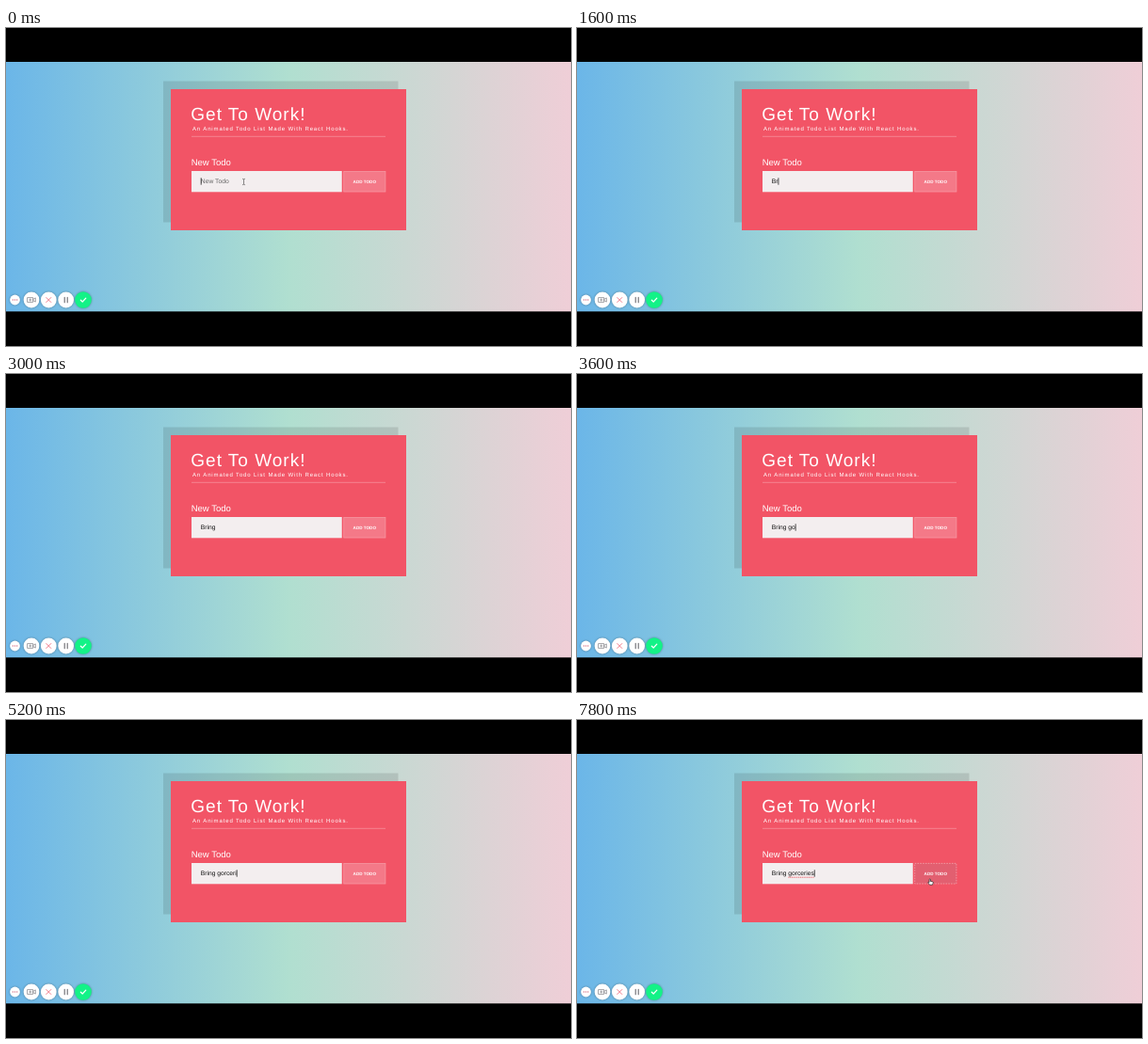
An HTML page that plays this animation: 600x338 px, repeating every 8 s.

```html
<!DOCTYPE html>
<html lang="en">
<head>
<meta charset="utf-8">
<title>Todo list</title>
<style>
  html, body { margin: 0; width: 100%; height: 100%; overflow: hidden; background: #000; }
  svg { display: block; width: 100vw; height: 100vh; }
  text { font-family: "Liberation Sans", Arial, Helvetica, sans-serif; fill: #fff;
         text-rendering: geometricPrecision; white-space: pre; }
  .tools > circle { filter: drop-shadow(0 .6px 1.2px rgba(0, 0, 0, .35)); }
</style>
</head>
<body>
<svg viewBox="0 0 600 338">
  <defs>
    <linearGradient id="sky">
      <stop offset="0" stop-color="#6bb6e8"/>
      <stop offset=".5" stop-color="#b0dfd0"/>
      <stop offset="1" stop-color="#efced7"/>
    </linearGradient>
  </defs>
  <rect width="600" height="338"/>
  <rect y="36" width="600" height="265.3" fill="url(#sky)"/>

  <!-- card -->
  <rect x="167" y="56.5" width="249.5" height="150" fill="#000" opacity=".11"/>
  <rect x="175" y="65" width="250" height="150" fill="#f25466"/>
  <text x="196.3" y="97.6" font-size="19" letter-spacing="1">Get To Work!</text>
  <text x="198" y="108.7" font-size="6" letter-spacing=".87">An Animated Todo List Made With React Hooks.</text>
  <path d="M197 115.3H403" stroke="#fff" stroke-opacity=".35" stroke-width=".8"/>
  <text x="196.7" y="146.3" font-size="9.5">New Todo</text>

  <!-- form -->
  <rect x="197" y="152" width="159.7" height="22.3" fill="#f3eeef"/>
  <text id="hint" x="206.8" y="165" font-size="6.75" style="fill:#666">New Todo</text>
  <text id="typed" x="206.8" y="165" font-size="6.7" style="fill:#111"></text>
  <path id="squiggle" fill="none" stroke="#e8434f" stroke-width=".8" stroke-dasharray="1.2 .6"/>
  <path id="caret" d="M0 159.3V166.7" stroke="#222" stroke-width=".8"/>
  <rect id="button" x="358.7" y="152.4" width="44.2" height="21.6" stroke-width=".8"/>
  <text x="368.6" y="164.8" font-size="4.6" font-weight="bold">ADD TODO</text>

  <!-- recorder controls -->
  <g class="tools" fill="none" stroke-linecap="round" stroke-linejoin="round">
    <circle cx="9.5" cy="289" r="5.4" fill="#fff"/>
    <circle cx="27" cy="289" r="8.4" fill="#fff"/>
    <circle cx="45.3" cy="289" r="8.4" fill="#fff"/>
    <circle cx="63.7" cy="289" r="8.4" fill="#fff"/>
    <circle cx="82" cy="289" r="8.8" fill="#13f287"/>
    <path d="M7.3 289h0M9.5 289h0M11.7 289h0" stroke="#d2657a" stroke-width="1.3"/>
    <path d="M23 286.6h5.7v4.8H23zM28.7 288.4l2.6-1.5v4.2l-2.6-1.5M24.7 289h2.2M25.8 287.9v2.2" stroke="#8b8b90" stroke-width=".8"/>
    <path d="M42.8 286.5l5 5M47.8 286.5l-5 5" stroke="#f17f8e" stroke-width="1"/>
    <path d="M62.2 286.2v5.6M65.2 286.2v5.6" stroke="#6c6c72" stroke-width="1.1"/>
    <path d="M79.3 289.2l1.9 1.8 3.6-3.8" stroke="#fff" stroke-width="1.2"/>
  </g>

  <!-- pointers -->
  <path id="beam" d="M-1.3 -3.2Q0 -3.2 0 -2.2Q0 -3.2 1.3 -3.2M0 -2.2V2.2M-1.3 3.2Q0 3.2 0 2.2Q0 3.2 1.3 3.2"
        fill="none" stroke="#555" stroke-width=".7"/>
  <path id="hand" d="M-1.4 -2.6Q-.7 -3.4 -.1 -2.6V-.6L2.2 -.1Q2.9 .2 2.7 1.2L2 3.2H-1L-2.8 .8Q-2.7 -.1 -1.4 .5Z"
        fill="#fff" stroke="#222" stroke-width=".7" stroke-linejoin="round"/>
</svg>
<script>
  const LOOP = 8000, STEP = 200, TEXT_X = 206.8, SIZE = 6.7;
  const PHRASE = "Bring gorceries";
  const $ = id => document.getElementById(id);

  // [time, value] tables; a value holds until the next time
  const letters = [[0, 0], [1400, 1], [1600, 2], [1800, 3], [2000, 4], [2200, 5], [2400, 6],
    [3400, 7], [3600, 8], [3800, 9], [4200, 10], [4600, 11], [4800, 12], [5200, 13], [6600, 15]];
  const caretOn = [[0, 1], [400, 0], [800, 1], [2800, 0], [3200, 1], [5800, 0], [6200, 1],
    [7200, 0], [7600, 1]];
  const pointer = [[0, [252.5, 163.5]], [1400, null], [7000, [262, 164]], [7200, [302, 168]],
    [7400, [348, 171]], [7600, [371, 172]], [7800, [375.5, 172]]];

  const at = (table, t) => table.filter(([start]) => start <= t).pop()[1];

  const pen = document.createElement("canvas").getContext("2d");
  pen.font = '100px "Liberation Sans", Arial, Helvetica, sans-serif';
  const endOf = text => TEXT_X + pen.measureText(text).width * SIZE / 100;
  const show = (el, on) => el.setAttribute("visibility", on ? "visible" : "hidden");

  function place(el, on, pos) {
    show(el, on);
    if (on) el.setAttribute("transform", `translate(${pos})`);
  }

  $("squiggle").setAttribute("d", `M${endOf("Bring ")} 167.2H${endOf(PHRASE)}`);

  function draw(now) {
    const t = Math.floor(now % LOOP / STEP) * STEP;
    const text = PHRASE.slice(0, at(letters, t));
    const pos = at(pointer, t);
    const hover = !!pos && pos[0] > 358;

    $("typed").textContent = text;
    show($("hint"), !text);
    place($("caret"), at(caretOn, t), [endOf(text) + .4, 0]);
    show($("squiggle"), t >= 7000);

    const button = $("button");
    button.setAttribute("fill", hover ? "#e25f70" : "#f47988");
    button.setAttribute("stroke", hover ? "#f3a5ae" : "#f797a2");
    button.setAttribute("stroke-dasharray", hover ? "1.6 1.2" : "none");

    place($("beam"), pos && pos[0] < 357, pos);
    place($("hand"), hover, pos);
  }

  function frame() {
    draw(performance.now());
    requestAnimationFrame(frame);
  }
  frame();
</script>
</body>
</html>
```
